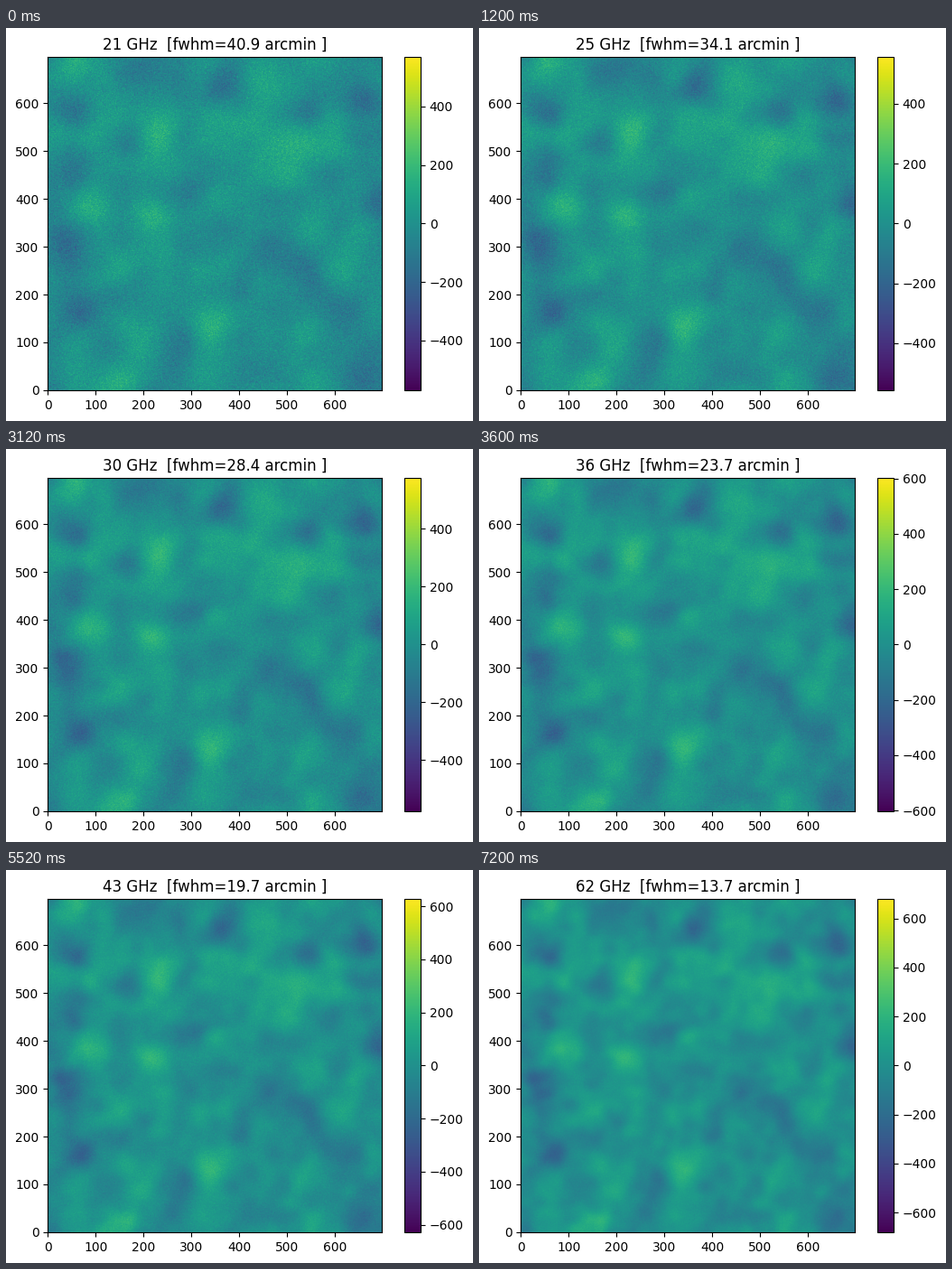
Recreate the animation shown at these times as a matplotlib script. Size 517 by 435 pixels, loop 8000 ms.

```python
import matplotlib.pyplot as plt
import numpy as np
from matplotlib.animation import FuncAnimation

W, H, DPI = 517, 435, 100
N = 698                 # map side in pixels
BANDS = 7
TICKS, TICK_MS = 20, 400
HOLD = 3                # ticks per band; the last band is cut short

SPOT, GRAIN = 25, 9     # intrinsic sizes of large spots and fine structure
PEAK, RMS = 175, 34     # strength of spots and of the random background

# Strongest spots of the sky, the rest is random
HOT = [(48, 682), (6, 533), (240, 527), (452, 641), (525, 511), (75, 382),
       (214, 378), (145, 250), (245, 272), (338, 125), (55, 82), (142, 20)]
COLD = [(165, 666), (45, 585), (350, 626), (175, 510), (45, 455), (540, 592),
        (665, 596), (684, 394), (40, 312), (77, 165), (275, 118), (655, 28)]

axis = np.arange(N)
k2 = np.fft.fftfreq(N)[:, None] ** 2 + np.fft.rfftfreq(N) ** 2
white = np.fft.rfft2(np.random.default_rng(11).standard_normal((N, N)))


def fwhm(band):
    return 40.9 / 1.2 ** band


def limit(band):
    """Colour range: the signal grows while the noise fades."""
    return 524 + 26.3 * band + 47 * 0.17 ** band


def spots(centres, size):
    x, y = np.array(centres).T[:, :, None]
    gx, gy = (np.exp(-((axis - c) / size) ** 2 / 2) for c in (x, y))
    return gy.T @ gx


def background(size, beam):
    """Random field of a given grain, smoothed by the beam."""
    smooth = np.exp(-2 * np.pi ** 2 * (size ** 2 + beam ** 2) * k2)
    return 2 * np.sqrt(np.pi) * size * np.fft.irfft2(white * smooth, (N, N))


def band_map(band):
    beam = fwhm(band) / 2.355
    size = np.hypot(SPOT, beam)
    sky = PEAK * (SPOT / size) ** 2 * (spots(HOT, size) - spots(COLD, size))
    sky += RMS * (background(SPOT, beam) + background(GRAIN, beam))
    noise = np.random.default_rng(100 + band).standard_normal((N, N))
    return sky - sky.mean() + 80 * 0.82 ** band * noise


maps = [band_map(b) for b in range(BANDS)]

# The small surplus keeps the pixel size from rounding down
fig = plt.figure(figsize=((W + 0.01) / DPI, (H + 0.01) / DPI), dpi=DPI)
SIDE, LEFT, BOTTOM = 369.6, 46.2, 33.8


def add_axes(left, width):
    return fig.add_axes([left / W, BOTTOM / H, width / W, SIDE / H])


ax = add_axes(LEFT, SIDE)
im = ax.imshow(maps[0], origin="lower", cmap="viridis", aspect="auto")
title = ax.set_title("")
fig.colorbar(im, cax=add_axes(LEFT + SIDE + 24.8, SIDE / 20))


def draw(tick):
    band = tick // HOLD
    im.set_data(maps[band])
    im.set_clim(-limit(band), limit(band))
    title.set_text(f"{20.8 * 1.2 ** band:.0f} GHz  [fwhm={fwhm(band):.1f} arcmin ]")
    return im, title


anim = FuncAnimation(fig, draw, frames=TICKS, interval=TICK_MS,
                     init_func=lambda: draw(0), repeat=True, blit=False)
plt.show()
```
